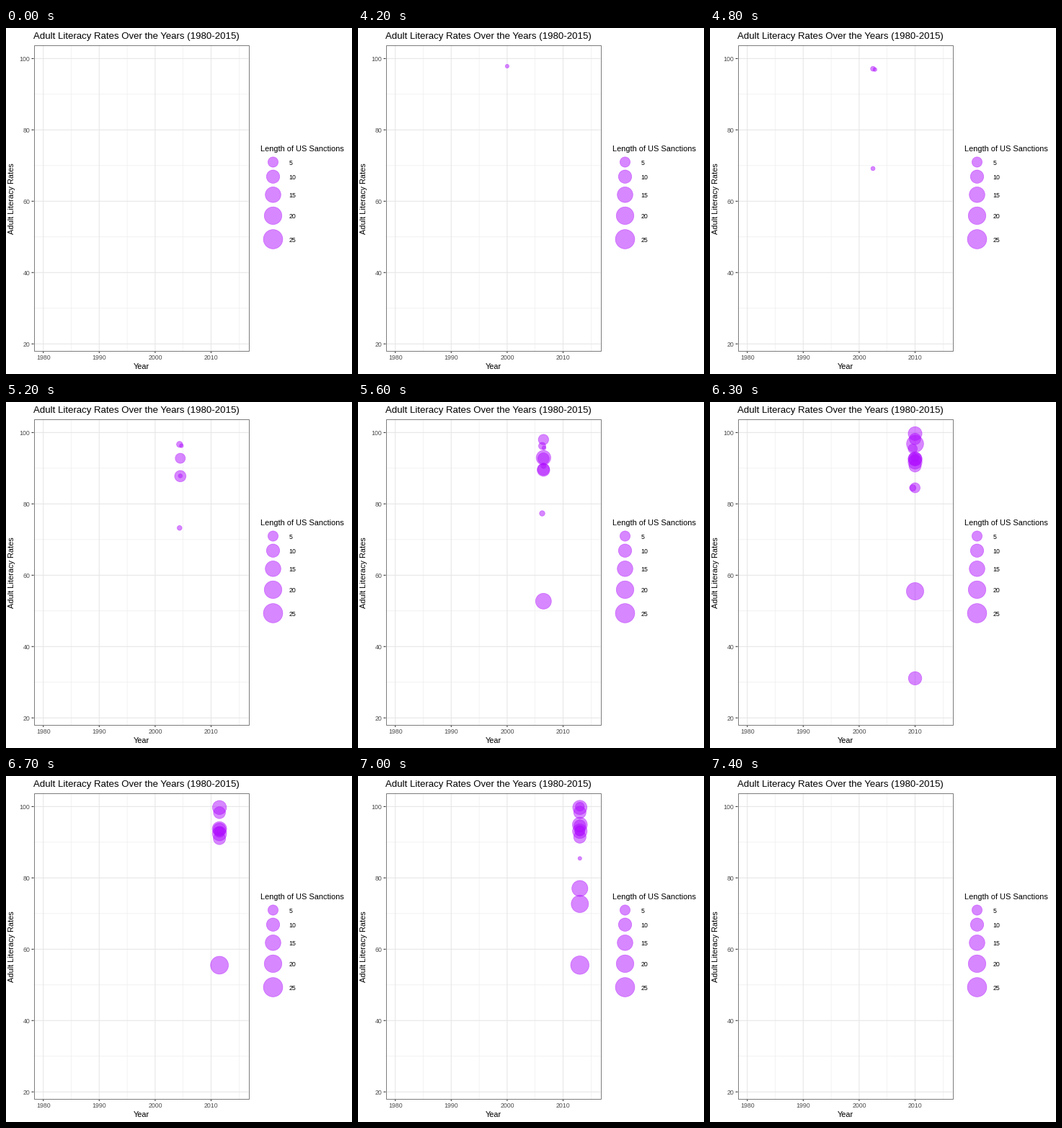
A matplotlib script for the animation above (7.5 s loop, 480 by 480 pixels).

```python
import math

import matplotlib.pyplot as plt
import numpy as np
from matplotlib.animation import FuncAnimation
from matplotlib.patches import Circle, Rectangle

SIZE, DPI = 480, 100
FRAMES, INTERVAL = 75, 100
PX = 72 / DPI
PURPLE = "#b010ff"
LEFT, RIGHT, TOP, BOTTOM = 38.5, 336.5, 23.5, 448.0

plt.rcParams["font.family"] = "Liberation Sans"
fig = plt.figure(figsize=(SIZE / DPI, SIZE / DPI), dpi=DPI, facecolor="white")
ax = fig.add_axes([0, 0, 1, 1])
ax.set_xlim(0, SIZE)
ax.set_ylim(SIZE, 0)
ax.axis("off")


def year_x(year):
    return 51.7 + 7.76 * (year - 1980)


def rate_y(rate):
    return 42.4 + 4.948 * (100 - rate)


def year_frame(year):
    return math.floor((year - 1980) * (FRAMES - 1) / 35 + 0.5)


def line(x0, y0, x1, y1, color, width):
    ax.plot([x0, x1], [y0, y1], color=color, lw=width * PX, zorder=1,
            solid_capstyle="butt", snap=False)


def text(x, y, label, size, color="black", **kw):
    kw.setdefault("va", "baseline")
    ax.text(x, y, label, fontsize=size * PX, color=color, **kw)


def dot(x, y, r):
    return ax.add_patch(Circle((x, y), r, facecolor=PURPLE, edgecolor=PURPLE,
                               alpha=0.5, lw=0.7 * PX, zorder=3))


def draw_chart():
    for year in range(1985, 2016, 10):
        line(year_x(year), TOP, year_x(year), BOTTOM, "#ebebeb", 0.6)
    for rate in range(30, 100, 20):
        line(LEFT, rate_y(rate), RIGHT, rate_y(rate), "#ebebeb", 0.6)
    for year in range(1980, 2011, 10):
        x = year_x(year)
        line(x, TOP, x, BOTTOM, "#e6e6e6", 1.07)
        line(x, BOTTOM, x, BOTTOM + 3, "#333333", 1.07)
        text(x, 460.2, str(year), 8.8, "#4d4d4d", ha="center")
    for rate in range(20, 101, 20):
        y = rate_y(rate)
        line(LEFT, y, RIGHT, y, "#e6e6e6", 1.07)
        line(LEFT - 3, y, LEFT, y, "#333333", 1.07)
        text(33.2, y + 3.3, str(rate), 8.8, "#4d4d4d", ha="right")
    ax.add_patch(Rectangle((LEFT, TOP), RIGHT - LEFT, BOTTOM - TOP, fill=False,
                           edgecolor="#7d7d7d", lw=PX, zorder=5))
    text(38, 15, "Adult Literacy Rates Over the Years (1980-2015)", 13.2)
    text(187.5, 473, "Year", 11, ha="center")
    text(13.5, 236.5, "Adult Literacy Rates", 11, ha="right", va="center",
         rotation=90)


def draw_legend():
    text(353, 171, "Length of US Sanctions", 11)
    for years, y in zip(range(5, 26, 5), (186, 206.2, 231.3, 260.4, 293)):
        dot(370.5, y, 2 + 2.28 * math.sqrt(years))
        text(392.7, y + 3.6, str(years), 8.8)


# Tracks are (year, y in pixels, radius) points.
# Countries with a long gap between two surveys.
SPARSE = [
    [(2000, 53, 2.6), (2008, 66, 2.8)],
    [(2002, 56, 3.2), (2011, 66.5, 7)],
    [(2002, 200, 2.8), (2011, 104, 4.8)],
]

# Countries surveyed every year, given at their turning points.
YEARLY = [
    [(2004, 105, 7.7), (2008, 88, 9.4), (2015, 72, 10.4)],
    [(2004, 78, 6.8), (2010, 79, 9.4), (2013, 69, 8.2)],
    [(2004, 106, 2.5), (2008, 78, 4.5), (2013, 76, 6.8)],
    [(2005, 290, 10.3), (2008, 262.7, 11.6), (2014, 262.3, 13)],
    [(2005, 52.5, 6.9), (2015, 50, 9)],
    [(2008, 54, 11.5), (2011, 60, 12)],
    [(2006, 77, 10.2), (2010, 79, 9.7), (2015, 60, 10.8)],
    [(2006, 94, 8.3), (2015, 82, 8.7)],
    [(2007, 82, 8.6), (2013, 76, 7.2)],
    [(2007, 123.5, 6.8), (2010, 119, 7)],
    [(2010, 43.8, 9.6), (2015, 43.5, 10.1)],
    [(2010, 383.3, 9.3), (2011, 385, 10)],
    [(2014, 214, 11.5), (2015, 214.5, 11.7)],
]

# Countries seen in one year only.
SINGLE = [(2005, 420, 8), (2008, 157, 7.9), (2013, 42.5, 6.2),
          (2013, 114.3, 2.6), (2013, 156, 11.1), (2013, 177.5, 12)]


def make_path(track, yearly):
    years, ys, radii = np.array(track, dtype=float).T
    stops = np.arange(years[0], years[-1] + 1) if yearly else years
    return [year_frame(y) for y in stops], stops, years, ys, radii


paths = [make_path(track, False) for track in SPARSE]
paths += [make_path(track, True) for track in YEARLY]
paths += [make_path([point], False) for point in SINGLE]

draw_chart()
draw_legend()
dots = [dot(0, 0, 1) for _ in paths]


def update(frame):
    for circle, (keys, stops, years, ys, radii) in zip(dots, paths):
        shown = keys[0] <= frame <= keys[-1] and frame < FRAMES - 1
        circle.set_visible(shown)
        if shown:
            now = np.interp(frame, keys, stops)
            circle.center = year_x(now), np.interp(now, years, ys)
            circle.set_radius(np.interp(now, years, radii))
    return dots


anim = FuncAnimation(fig, update, frames=FRAMES, interval=INTERVAL,
                     repeat=True, repeat_delay=0, blit=False)
plt.show()
```
